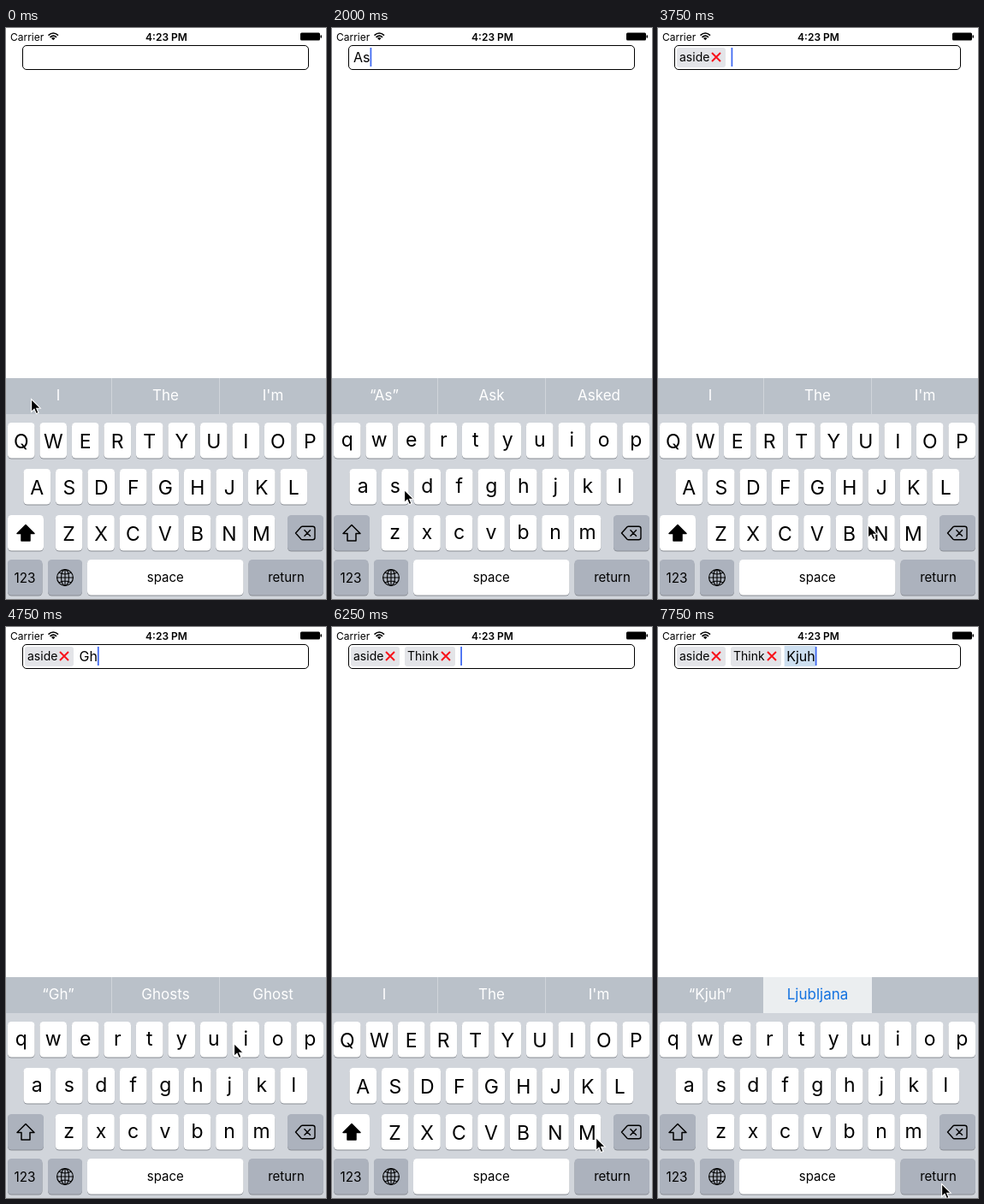
An HTML page that plays this animation: 374x667 px, repeating every 8 s.

```html
<!DOCTYPE html>
<html lang="en">
<head>
<meta charset="utf-8">
<title>Tag field</title>
<style>
html, body { margin: 0; width: 100%; height: 100%; overflow: hidden; background: #fff; }
svg { display: block; width: 374px; height: 667px; font-family: Inter, Roboto, sans-serif; }
.mid { text-anchor: middle; }
.pop { filter: drop-shadow(0 1px 3px rgba(0, 0, 0, .4)); }
</style>
</head>
<body>
<svg id="stage" viewBox="0 0 374 667"></svg>
<script>
const STEP = 250, LOOP = 8000;
const DEFAULT = "I,The,I'm";

// pointer x, pointer y, typed text, popped key, suggestions, flags
// suggestions: * = highlighted, | = pale from here
// flags: c = caret hidden, s = text selected, r = return pressed
const steps = [
  [29, 433, "", "", DEFAULT, "c"],
  [29, 452, "", "", DEFAULT, ""],
  [30, 486, "", "", DEFAULT, ""],
  [31, 520, "", "", DEFAULT, "c"],
  [31, 540, "", "", DEFAULT, "c"],
  [31, 541, "", "A", DEFAULT, ""],
  [52, 540, "A", "", "“A”,And,Are", ""],
  [70, 540, "A", "s", "“A”,And,Are", ""],
  [84, 539, "As", "", "“As”,Ask,Asked", ""],
  [106, 538, "As", "d", "“As”,Ask,Asked", ""],
  [107, 512, "Asd", "", "“Asd”,,", ""],
  [107, 492, "Asde", "e", "“Asde”,,", ""],
  [168, 540, "Asde", "", "“Asde”,aside*,", "s"],
  [268, 612, "Asde", "", "“Asde”,aside*,", "s"],
  [312, 642, "Asde", "", "“Asde”,aside*,", "s"],
  [245, 580, "", "", DEFAULT, ""],
  [188, 540, "", "G", DEFAULT, ""],
  [206, 540, "G", "", "“G”,Good,Got", ""],
  [222, 538, "G", "h", "“G”,Good,Got", ""],
  [266, 486, "Gh", "", "“Gh”,Ghosts,Ghost", ""],
  [277, 485, "Gh", "i", "“Gh”,Ghosts,Ghost", ""],
  [264, 532, "Ghi", "j", "“Ghi”,Ghost,Ghosts", ""],
  [288, 604, "Ghij", "", "“Ghij”,Think*,", "s"],
  [316, 653, "Ghij", "", "“Ghij”,Think*,", "s"],
  [316, 653, "Ghij", "", "“Ghij”,Think*,", "sr"],
  [308, 596, "", "", DEFAULT, ""],
  [296, 536, "", "K", DEFAULT, ""],
  [249, 521, "K", "j", "“Kj”,\u00a0Kee|p*,\u00a0\u00a0Km|ow", ""],
  [240, 492, "Kj", "u", "“Kj”,Keep*,Km", ""],
  [232, 514, "Kju", "", "“Kju”,Kin,Knight", ""],
  [228, 538, "Kjuh", "h", "“Kju”,Kin,Knight", ""],
  [331, 650, "Kjuh", "", "“Kjuh”,Ljubljana*,", "s"]
];

const stage = document.getElementById("stage");

function add(tag, attrs, parent = stage, content = "") {
  const el = document.createElementNS("http://www.w3.org/2000/svg", tag);
  for (const name in attrs) el.setAttribute(name, attrs[name]);
  el.textContent = content;
  return parent.appendChild(el);
}
const rect = (x, y, width, height, fill, rx = 0, parent) => add("rect", { x, y, width, height, fill, rx }, parent);
const text = (x, y, size, str, more = {}, parent) => add("text", { x, y, "font-size": size, ...more }, parent, str);
const line = (d, width = 1.3, more = {}, parent) =>
  add("path", { d, fill: "none", stroke: "#000", "stroke-width": width, ...more }, parent);
const show = (el, on) => el.setAttribute("visibility", on ? "visible" : "hidden");
const mid = { class: "mid" };

rect(0, 0, 374, 667, "#fff");

// status bar
text(5, 14.5, 12, "Carrier");
text(187.5, 14.5, 12, "4:23 PM", { class: "mid", "font-weight": 600 });
line("M49.5 8.6Q55.3 3.4 61 8.6M51.5 10.8Q55.3 7.3 59 10.8", 1.6);
add("path", { d: "M53 12Q55.3 10.2 57.5 12L55.3 14.3Z" });
rect(344, 5.5, 23, 9, "#000", 1.5);
rect(367.5, 8.2, 1.5, 3.6, "#000", 0.7);

// tag field
add("rect", { x: 19.5, y: 20.5, width: 334, height: 28, rx: 4.5, fill: "#fff", stroke: "#000" });
function makeChip(x, width, label) {
  const g = add("g", {}), end = x + width;
  rect(x, 23, width, 23, "#e3e4e8", 3, g);
  text(x + 3, 39, 14, label, {}, g);
  line(`M${end - 16} 29l10 10m0 -10l-10 10`, 2, { stroke: "#f8131b" }, g);
  return g;
}
const chips = [
  { el: makeChip(22, 57, "aside"), from: 15, next: 85.5 },
  { el: makeChip(85, 59, "Think"), from: 25, next: 150.2 }
];
const selection = rect(0, 22, 0, 24, "#cddff0");
const typed = text(25, 40, 16, "");
const caret = rect(25, 23, 1.8, 22, "#426bf2");

// suggestion bar
rect(0, 409, 374, 258, "#d1d5db");
rect(0, 409, 374, 42, "#bac1c9");
rect(123, 409, 1, 42, "#d0d5da");
rect(249, 409, 1, 42, "#d0d5da");
const glow = rect(123, 409, 127, 42, "#ebeef0");
const hints = [61, 186.5, 312].map(x => text(x, 434.5, 17, "", mid));

// keyboard
const GREY = "#acb2bd";
function makeKey(x, y, width, fill) {
  rect(x, y + 1, width, 41.5, "#898d94", 4.5);
  return rect(x, y, width, 41.5, fill, 4.5);
}
const keys = {};
[["qwertyuiop", 17.75, 461], ["asdfghjkl", 36.3, 515], ["zxcvbnm", 73.5, 569]].forEach(([row, x0, y]) => {
  [...row].forEach((ch, i) => {
    const x = x0 + 37.5 * i;
    makeKey(x - 15.8, y, 31.6, "#fff");
    keys[ch] = { x, y, label: text(x, y, 23, ch, mid) };
  });
});

const shiftKey = makeKey(2, 569, 42, GREY);
const shiftIcon = add("path", {
  d: "M23 580.5L33 590.5H28V599H18V590.5H13Z",
  stroke: "#000", "stroke-width": 1.5, "stroke-linejoin": "round"
});
makeKey(329, 569, 42, GREY);
line("M338.5 590L345 582.8Q345.6 582.2 346.5 582.2H358.5Q361 582.2 361 584.7V595.3Q361 597.8 358.5 597.8H346.5Q345.6 597.8 345 597.2ZM348.5 586.3l7.4 7.4m0 -7.4l-7.4 7.4", 1.4, { "stroke-linejoin": "round" });
makeKey(2, 621, 40.5, GREY);
text(22, 647.5, 15.3, "123", mid);
makeKey(49, 621, 40, GREY);
add("circle", { cx: 69, cy: 642, r: 9.4, fill: "none", stroke: "#000", "stroke-width": 1.2 });
add("ellipse", { cx: 69, cy: 642, rx: 4.5, ry: 9.4, fill: "none", stroke: "#000", "stroke-width": 1.1 });
line("M69 632.6V651.4M59.6 642H78.4M62 636Q69 640 76 636M62 648Q69 644 76 648", 1.1);
makeKey(95, 621, 182.5, "#fff");
text(186.3, 647, 15, "space", mid);
const returnKey = makeKey(283.5, 621, 87.5, GREY);
text(327.5, 647, 15, "return", mid);

// enlarged key, drawn around its key's top centre
const pop = add("g", { class: "pop" });
add("path", {
  d: "M-28.7 -56q0 -9 9 -9h39.4q9 0 9 9V-24c0 14 -12.7 14 -12.7 28V37q0 4.5 -4.5 4.5h-23q-4.5 0 -4.5 -4.5V4c0 -14 -12.7 -14 -12.7 -28z",
  fill: "#fff"
}, pop);
const popLabel = text(0, -22.5, 38, "", { class: "mid", "font-weight": 300 }, pop);

const pointer = add("path", {
  d: "M.6 .6V15.4L4 12.2L6.4 17.6L9 16.5L6.7 11.2H11.2Z",
  stroke: "#fff", "stroke-width": 1.1
});

function setHint(el, hint) {
  const on = hint.endsWith("*");
  const [main, pale] = hint.replace("*", "").split("|");
  el.textContent = main;
  if (pale) add("tspan", { "fill-opacity": 0.35 }, el, pale);
  el.setAttribute("fill", on ? "#1372e0" : "#fff");
  return on;
}

function draw(n) {
  const [x, y, str, key, hintList, flags] = steps[n];

  let start = 25;
  for (const chip of chips) {
    show(chip.el, n >= chip.from);
    if (n >= chip.from) start = chip.next;
  }
  typed.textContent = str;
  typed.setAttribute("x", start);
  const width = str ? typed.getComputedTextLength() : 0;
  caret.setAttribute("x", start + width);
  show(caret, !flags.includes("c"));
  selection.setAttribute("x", start - 2.5);
  selection.setAttribute("width", width + 3);
  show(selection, flags.includes("s"));

  const lit = hintList.split(",").map((hint, i) => setHint(hints[i], hint));
  show(glow, lit[1]);

  const upper = !str;
  for (const ch in keys) {
    const { label, y: top } = keys[ch];
    label.textContent = upper ? ch.toUpperCase() : ch;
    label.setAttribute("y", top + (upper ? 29.5 : 28));
  }
  shiftKey.setAttribute("fill", upper ? "#fff" : GREY);
  shiftIcon.setAttribute("fill", upper ? "#000" : "none");
  returnKey.setAttribute("fill", flags.includes("r") ? "#fff" : GREY);

  show(pop, key);
  if (key) {
    const at = keys[key.toLowerCase()];
    pop.setAttribute("transform", `translate(${at.x} ${at.y})`);
    popLabel.textContent = key;
  }
  pointer.setAttribute("transform", `translate(${x} ${y})`);
}

let shown = -1;
const begin = performance.now();
function tick() {
  const n = Math.floor((performance.now() - begin) % LOOP / STEP);
  if (n !== shown) draw(shown = n);
  requestAnimationFrame(tick);
}
tick();
</script>
</body>
</html>
```
